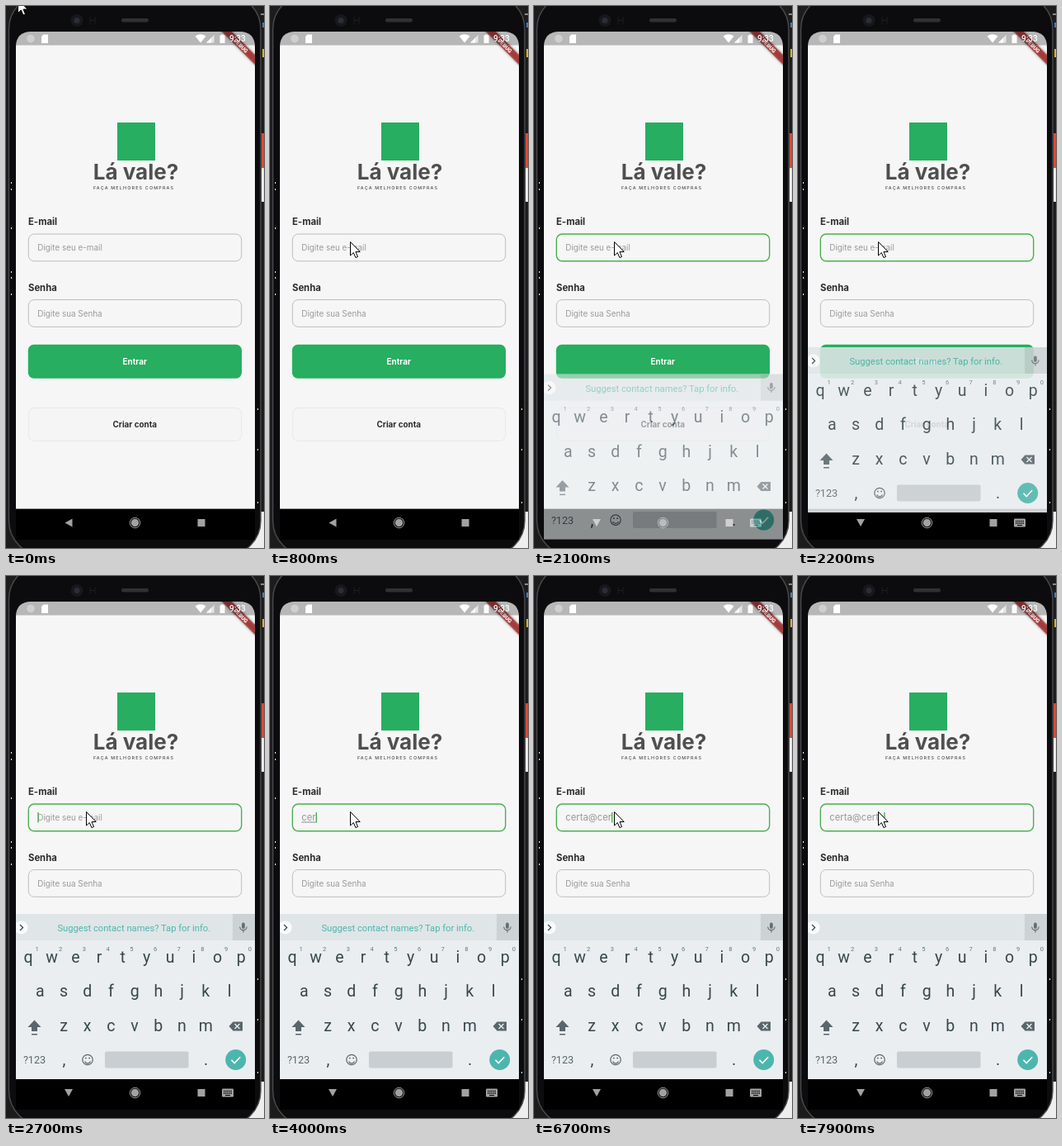
Recreate the animation shown at these times as an HTML page. Size 313 by 656 pixels, loop 8000 ms.

```html
<!DOCTYPE html>
<html lang="pt-BR">
<head>
<meta charset="utf-8">
<title>Login</title>
<style>
html, body { margin: 0; width: 100%; height: 100%; overflow: hidden; background: #1c1c1c; }
svg { display: block; width: 313px; height: 656px; }
text { font-family: Inter, sans-serif; font-size: 9.88px; }
.mid { text-anchor: middle; }
.label { font-size: 11.29px; font-weight: 700; fill: #2a2a2a; }
.hint { fill: #9a9a9a; }
.field { fill: none; stroke: #bdbdbd; stroke-width: 1; }
.field.focus { stroke: #4caf50; stroke-width: 1.4; }
#typed { font-size: 11.29px; fill: #979797; }
#board text { font-family: Roboto, sans-serif; text-anchor: middle; fill: #37474f; }
#board .key { font-size: 19.5px; }
#board .num { font-size: 7.5px; fill: #66757c; }
#board .sug { font-size: 12.7px; fill: #647077; }
</style>
</head>
<body>
<svg viewBox="0 0 313 656">
  <defs>
    <clipPath id="screen"><path d="M12 609V50Q12 31 31 31H283Q302 31 302 50V609Z"/></clipPath>
    <clipPath id="panel"><rect x="12" y="31" width="290" height="615"/></clipPath>
    <filter id="soft" x="-20%" y="-100%" width="140%" height="300%"><feGaussianBlur stdDeviation="1.800"/></filter>
  </defs>

  <!-- desktop behind the phone -->
  <rect width="313" height="656" fill="#1c1c1c"/>
  <rect x="309" y="9" width="4" height="2" fill="#888"/>
  <rect x="311" y="20" width="2" height="6" fill="#3d7fc4"/>
  <rect x="311" y="52" width="2" height="10" fill="#d9b432"/>
  <rect x="310" y="154" width="3" height="42" fill="#e2472f"/>
  <rect x="310" y="196" width="3" height="41" fill="#e9e9e9"/>
  <rect x="290" y="612" width="23" height="44" fill="#eee"/>

  <!-- phone body -->
  <rect x="3.500" y="-14" width="305.500" height="679" rx="42" fill="#0c0c0e" stroke="#4a4b4d" stroke-width="1.400"/>
  <circle cx="86" cy="17.500" r="7.500" fill="#17181c"/>
  <circle cx="86" cy="17.500" r="3.500" fill="#2b2d36"/>
  <path d="M102 13v9M108 13v9M102 17.500h6" stroke="#1c1d20" fill="none"/>
  <rect x="140" y="15" width="33" height="4.500" rx="2.200" fill="#303133"/>
  <path id="specks" fill="#eee"/>

  <g clip-path="url(#screen)">
    <rect x="12" y="31" width="290" height="578" fill="#f6f6f6"/>
    <rect x="135" y="141" width="46" height="46" fill="#27ae60"/>
    <text class="mid" x="157.500" y="209.700" style="font-size:26px;font-weight:700" fill="#4f4f4f">Lá vale?</text>
    <text x="106" y="221.500" style="font-size:5.4px;font-weight:500;letter-spacing:1.17px" fill="#4f4f4f">FAÇA MELHORES COMPRAS</text>

    <text class="label" x="27" y="264.500">E-mail</text>
    <rect id="mail" class="field" x="27.300" y="276" width="258.400" height="32.800" rx="7"/>
    <text id="hint" class="hint" x="38.300" y="296.200">Digite seu e-mail</text>
    <text id="typed" x="38.300" y="296.400"></text>
    <rect id="caret" y="286" width="1.400" height="12.500" fill="#4caf50"/>

    <text class="label" x="27" y="344.500">Senha</text>
    <rect class="field" x="27.300" y="355.500" width="258.400" height="32.800" rx="7"/>
    <text class="hint" x="38.300" y="375.700">Digite sua Senha</text>

    <rect x="26.800" y="409.700" width="259.200" height="41" rx="7" fill="#27ae60"/>
    <text class="mid" x="156.300" y="434" font-weight="700" fill="#fff">Entrar</text>
    <rect x="27.300" y="486.500" width="258.400" height="40" rx="7" fill="#f5f5f5" stroke="#e8e8e8"/>
    <text class="mid" x="156.300" y="510.300" font-weight="700" fill="#2a2a2a">Criar conta</text>

    <!-- debug ribbon and status bar -->
    <g transform="translate(302 31) rotate(45)">
      <rect x="-30" y="19.800" width="60" height="8.500" fill-opacity=".5" filter="url(#soft)"/>
      <rect x="-30" y="19.800" width="60" height="8.500" fill="#b71c1c" fill-opacity=".66"/>
      <text class="mid" y="26.500" style="font:900 6.6px Roboto,sans-serif" fill="#fff">DEBUG</text>
    </g>
    <rect x="12" y="31" width="290" height="16.500" fill="#000" fill-opacity=".26"/>
    <g fill="#fff">
      <circle cx="30" cy="39.500" r="4.800" fill="#cfcfcf"/>
      <path d="M45.500 34.500H51V45H43V37Z"/>
      <path d="M229.500 36.500Q236 32 242.500 36.500L236 44.500Z"/>
      <path d="M252.500 35v9.500H243Z" fill-opacity=".65"/>
      <path d="M249 38.500v6h-6Z"/>
      <path d="M261 34.500h3v1h1.500v9.500h-6v-9.500H261Z"/>
      <text x="271" y="43.300" style="font:500 10px Roboto,sans-serif">9:33</text>
    </g>
  </g>

  <!-- navigation bar -->
  <rect x="12" y="608.600" width="290" height="37.400" fill="#000"/>
  <g fill="#a2a2a2">
    <path id="back" d="M71.500 625.500l9-5v10Z"/>
    <circle cx="156.500" cy="625.500" r="4.700"/>
    <circle cx="156.500" cy="625.500" r="6.200" fill="none" stroke="#a2a2a2"/>
    <rect x="232.500" y="621" width="9" height="9"/>
    <g id="ime">
      <rect x="262" y="620.500" width="14" height="10" rx="1.200"/>
      <path d="M264 623.500h10M264 626h10" stroke="#000" stroke-width="1.300" stroke-dasharray="1.300 .85"/>
      <path d="M266 628.500h6" stroke="#000"/>
    </g>
  </g>

  <g clip-path="url(#panel)">
    <g id="board">
      <rect x="12" y="409" width="290" height="200" fill="#eaeef0"/>
      <rect x="12" y="409" width="290" height="32" fill="#e0e5e8"/>
      <rect x="275" y="409" width="27" height="32" fill="#cdd2d5"/>
      <circle cx="18.500" cy="425.500" r="8" fill="#fafafa"/>
      <path d="M17 422l3.500 3.500L17 429" fill="none" stroke="#37474f" stroke-width="1.300"/>
      <rect x="286" y="419.500" width="3.800" height="7.500" rx="1.900" fill="#647077"/>
      <path d="M283.700 424.500a4.200 4.200 0 0 0 8.400 0M287.900 428.800v2.700" fill="none" stroke="#647077" stroke-width="1.200"/>
      <text id="tip" x="155.300" y="430" style="font-size:11.2px;fill:#4db6ac">Suggest contact names? Tap for info.</text>
      <g id="words">
        <path d="M113.500 417.500v16M198.500 417.500v16" stroke="#cbd1d4"/>
        <text class="sug" x="75.500" y="430">certa</text>
        <text class="sug" x="156" y="430" font-weight="700">cert</text>
        <text class="sug" x="236.500" y="430">certas</text>
      </g>
      <g id="keys"></g>
      <g fill="#59666c">
        <path d="M34.500 537.500l8 8.500h-4.500v5h-7v-5h-4.500Z"/>
        <rect x="31" y="554" width="7" height="1.500"/>
        <path d="M270.500 545l5-5.500H287v11h-11.500Z"/>
      </g>
      <path d="M277.500 542l6 6m0-6l-6 6" stroke="#e9eef1" stroke-width="1.400"/>
      <text x="34.500" y="590.300" style="font-size:12.6px;fill:#59666c">?123</text>
      <text class="key" x="70.500" y="592">,</text>
      <text class="key" x="242.500" y="592">.</text>
      <g fill="none" stroke="#59666c" stroke-width="1.200">
        <circle cx="99" cy="585.500" r="6.200"/>
        <path d="M95.500 587.500a3.800 3.800 0 0 0 7 0"/>
        <path d="M96 583.500h1.700M100.300 583.500h1.700" stroke-width="1.700"/>
      </g>
      <rect x="120" y="575.500" width="101.500" height="20" rx="2" fill="#c8ced1"/>
      <circle cx="278.700" cy="585.500" r="12.500" fill="#4db6ac"/>
      <path d="M273.500 585.800l3.700 3.700 7-7.300" fill="none" stroke="#fff" stroke-width="1.600"/>
    </g>
  </g>

  <path id="mouse" d="M0 0V16.500L3.800 13L6.400 19L9 18L6.500 12H11.700Z" fill="#fff" stroke="#000"/>
</svg>
<script>
const LOOP = 8000, STEP = 100;
const $ = id => document.getElementById(id);
const show = (id, on) => $(id).setAttribute('visibility', on ? 'visible' : 'hidden');
const within = (t, spans) => spans.some(([a, b]) => t >= a && t < b);

// keyboard letters
const PITCH = 28.7;
const rows = [['qwertyuiop', 27, 467.5], ['asdfghjkl', 41.4, 509], ['zxcvbnm', 70, 550.7]];
$('keys').innerHTML = rows.map(([letters, x0, y], r) =>
  [...letters].map((c, i) => {
    const x = x0 + i * PITCH;
    const num = r ? '' : `<text class="num" x="${x + 10.5}" y="453.5">${(i + 1) % 10}</text>`;
    return `<text class="key" x="${x}" y="${y}">${c}</text>${num}`;
  }).join('')).join('');

// light leaking along the phone's edge
$('specks').setAttribute('d',
  [213, 221, 268, 321, 328, 348].map(y => `M6 ${y}h1v2h-1z`).join('') +
  [487, 536, 600].map(y => `M305 ${y}h1v2h-1z`).join(''));

const WORD = 'certa@certa';
const strokes = [3200, 3400, 4000, 4200, 4400, 5900, 6300, 6500, 6700, 6800, 7000];
const caretOn = [[1700, 2100], [2700, 4700], [5200, 5700], [5900, 7400], [7900, LOOP]];
const slide = { 2000: [78, .2], 2100: [36.6, .6], 2200: [4, .88] };

function draw(time) {
  const t = Math.floor(time / STEP) * STEP;

  const p = Math.min(1, Math.max(0, (t - 200) / 600));
  const e = p * p * (3 - 2 * p);
  $('mouse').setAttribute('transform', `translate(${14.5 + 83 * e} ${-8 + 293.5 * e})`);

  const focus = t >= 1700;
  $('mail').classList.toggle('focus', focus);
  $('back').setAttribute('transform', focus ? 'rotate(-90 76 625.5)' : '');
  show('ime', focus);

  const [dy, alpha] = slide[t] || [0, t < 2000 ? 0 : 1];
  $('board').setAttribute('transform', `translate(0 ${dy})`);
  $('board').setAttribute('opacity', alpha);
  show('tip', t < 4200);
  show('words', t >= 4200 && t < 5900);

  const text = WORD.slice(0, strokes.filter(s => s <= t).length);
  const typed = $('typed');
  if (typed.textContent !== text) typed.textContent = text;
  typed.style.textDecoration = t < 6100 ? 'underline' : 'none';
  show('hint', !text);
  $('caret').setAttribute('x', 38.3 + (text ? typed.getComputedTextLength() : 0));
  show('caret', within(t, caretOn));
}

const start = performance.now();
function tick() {
  draw((performance.now() - start) % LOOP);
  requestAnimationFrame(tick);
}
tick();
</script>
</body>
</html>
```
